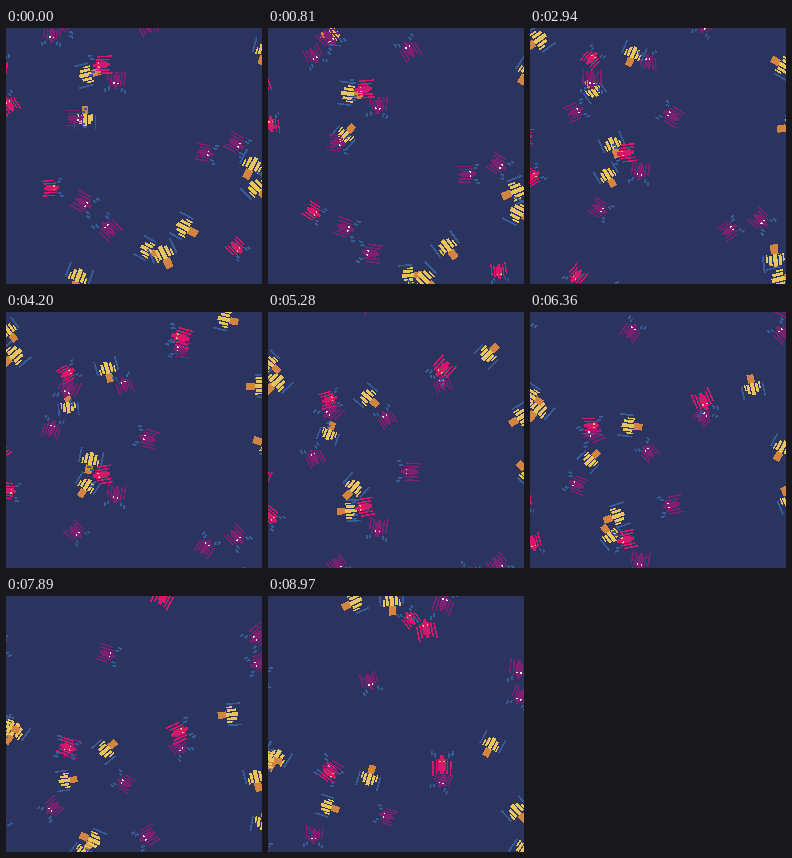
Recreate the animation shown at these times as an HTML page with a canvas. Size 256 by 256 pixels, loop 9000 ms.

```html
<!DOCTYPE html>
<html>
<head>
<meta charset="utf-8">
<style>
html, body { margin: 0; width: 100%; height: 100%; overflow: hidden; background: #2b335f; }
canvas { display: block; width: 100vw; height: 100vh; image-rendering: pixelated; }
</style>
</head>
<body>
<canvas id="stage" width="256" height="256"></canvas>
<script>
const ctx = document.getElementById('stage').getContext('2d');
const LOOP = 9000, STEP = 30, SIZE = 256;
const NAVY = '#2b335f', PURPLE = '#7e2072', BLUE = '#395c98', WHITE = '#eeeeee';
const RED = '#d4186c', ORANGE = '#d38441', YELLOW = '#e9c35b';

// Mirrored parts, front pointing up: colour, inner x, outer x, top, bottom
const beetle = (shell, eyes) => [
  [eyes, 1.2, 2.7, -3.2, -1.6],
  [shell, 0, 1.7, -8, 9],
  [shell, 1.7, 3.4, -5, 6],
  [shell, 4.3, 5.8, -5, 9],
  [shell, 7.4, 8.9, -3, 11],
  [BLUE, 5.4, 7.3, -10, -6],
  [BLUE, 8.6, 10.5, -12, -8]
];
const bee = [
  [ORANGE, 0, 3.6, -11, -2],
  [YELLOW, 0, 2, -2, 11],
  [YELLOW, 3.2, 6, -1, 9],
  [YELLOW, 7, 8.6, -2, 5],
  [BLUE, 10.4, 12.2, -1, 14]
];

let seed = 7;
function random(low, high) {
  seed = seed * 16807 % 2147483647;
  return low + (high - low) * seed / 2147483647;
}

// Bugs of one speed; heading, spin and size are drawn at random
const swarm = (parts, fall, starts) => starts.map(([x, y]) => ({
  parts, fall, x, y,
  heading: random(0, 360),
  turn: random(-60, 60),
  scale: random(.85, 1.1)
}));

const purple = beetle(PURPLE, WHITE), red = beetle(RED, YELLOW);
const bugs = [
  swarm(bee, 21, [[79, 88]]),
  swarm(bee, 25, [[84, 46], [181, 201], [258, 26], [102, -45], [62, -13],
    [6, -60], [84, -217], [124, -216]]),
  swarm(bee, 30, [[245, 140], [253, 162], [144, 223], [159, 229], [71, 252],
    [251, -52], [4, -105], [222, -118]]),
  swarm(purple, 20, [[62, -6]]),
  swarm(purple, 26, [[46, 7], [200, 125], [231, 116], [102, -147], [-8, -153]]),
  swarm(purple, 31, [[110, 53], [141, -4], [70, 90], [78, 175], [102, 200],
    [118, -58], [174, -93], [252, -177], [251, -204], [176, -272]]),
  swarm(red, 24.5, [[3, 76], [-6, 36], [62, -42]]),
  swarm(red, 30, [[95, 37], [46, 160], [231, 220], [174, -101], [142, -247], [158, -237]])
].flat();

// Nearest-pixel rotation keeps the edges hard
function drawBug({ parts, x: cx, y, fall, heading, turn, scale }, t) {
  const cy = y + fall * t, reach = 19 * scale;
  if (cy < -reach || cy > SIZE + reach) return;
  const angle = (heading + turn * t) * Math.PI / 180;
  const c = Math.cos(angle) / scale, s = Math.sin(angle) / scale;
  for (let py = Math.floor(cy - reach); py <= cy + reach; py++) {
    for (let px = Math.floor(cx - reach); px <= cx + reach; px++) {
      const dx = px + .5 - cx, dy = py + .5 - cy;
      const u = Math.abs(dx * c + dy * s), v = dy * c - dx * s;
      const part = parts.find(p => u >= p[1] && u < p[2] && v >= p[3] && v < p[4]);
      if (!part) continue;
      ctx.fillStyle = part[0];
      ctx.fillRect(px, py, 1, 1);
    }
  }
}

const start = performance.now();
function frame() {
  const elapsed = (performance.now() - start) % LOOP;
  const t = Math.floor(elapsed / STEP) * STEP / 1000;
  ctx.fillStyle = NAVY;
  ctx.fillRect(0, 0, SIZE, SIZE);
  for (const bug of bugs) drawBug(bug, t);
  requestAnimationFrame(frame);
}
frame();
</script>
</body>
</html>
```
